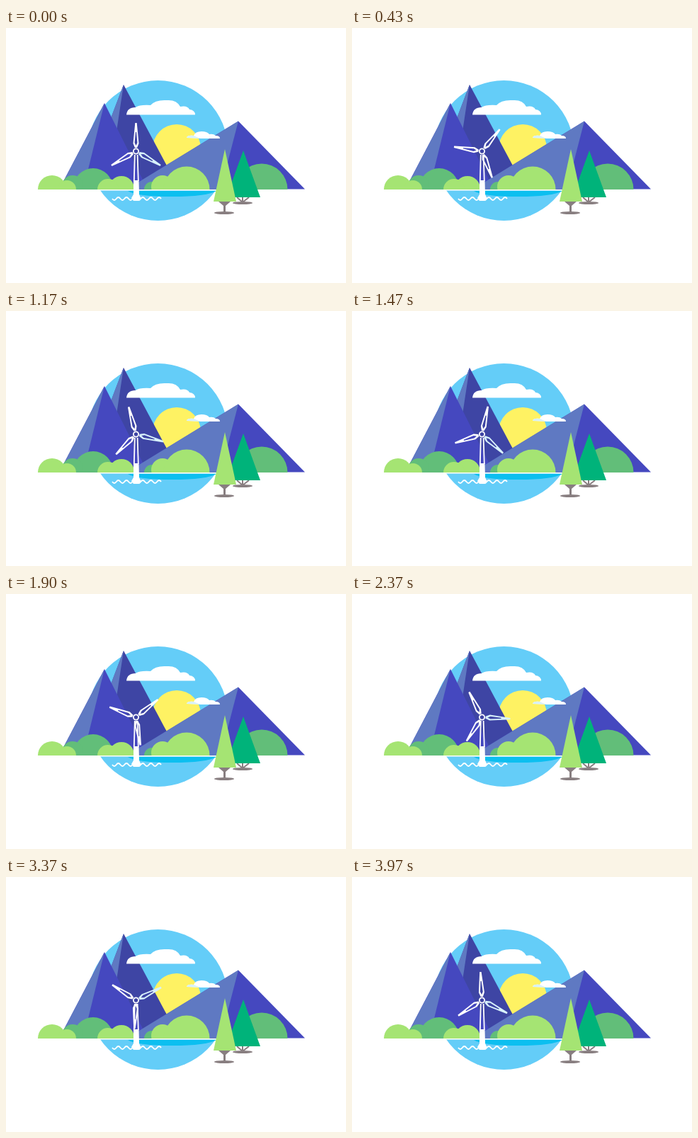
An HTML page for the animation above (4010 ms loop, 480 by 360 pixels).

```html
<!DOCTYPE html>
<html lang="en">
<head>
<meta charset="utf-8">
<title>Wind turbine landscape</title>
<style>
html, body { margin: 0; width: 100%; height: 100%; overflow: hidden; background: #fff; }
svg { display: block; width: 480px; height: 360px; }
.sky { fill: #64cdf8; }
.light { fill: #5f79c2; }
.face { fill: #4548bf; }
.shade { fill: #3e45a4; }
.lime { fill: #a5e473; }
.green { fill: #62be79; }
.white { fill: #fff; }
.pale { fill: #d8f1fb; }
.wood { fill: #887e80; }
.line { fill: none; stroke: #fff; stroke-width: 1.8; }
.twig { fill: none; stroke: #887e80; stroke-width: 2; }
</style>
</head>
<body>
<svg viewBox="0 0 480 360">
  <defs>
    <clipPath id="ground"><rect width="480" height="228"/></clipPath>
    <path id="blade" fill-rule="evenodd" d="M-1.600-5-4-11-1.200-40H1.200L4-11 1.600-5ZM0-8-1.900-12-.6-27H.6L1.900-12Z"/>
  </defs>

  <circle class="sky" cx="214.500" cy="173" r="99"/>
  <circle cx="241" cy="170" r="34" fill="#fef263"/>

  <g clip-path="url(#ground)">
    <path class="shade" d="M166 80 245 228H110Z"/>
    <path class="light" d="M166 80 143 140 156 146Z"/>
    <path class="face" d="M139 106 200 228H75Z"/>
    <path class="light" d="M139 106 109 228H75Z"/>
    <path class="face" d="M328 131.500 422 227.500H171Z"/>
    <path class="light" d="M328 131.500 303 228H170Z"/>

    <g class="green">
      <circle cx="123" cy="226" r="28"/>
      <circle cx="94" cy="223" r="15"/>
      <circle cx="206" cy="228" r="11"/>
      <circle cx="361" cy="228" r="36.500"/>
    </g>
    <g class="lime">
      <circle cx="65" cy="228" r="20"/>
      <circle cx="86" cy="228" r="13"/>
      <circle cx="163" cy="227" r="18"/>
      <circle cx="144" cy="228" r="15"/>
      <circle cx="221" cy="224" r="16"/>
      <circle cx="255" cy="228" r="32.500"/>
    </g>
  </g>

  <path class="white" d="M45 228H300V229.500H45Z"/>
  <path d="M172 230H297Q283 238 235 238 185 238 172 230Z" fill="#0cbff0"/>

  <g class="white">
    <path d="M170 122.500Q171 112 183 112 189 108 204 109 211 101 227 102 241 101 246 111 256 109 259 115 267 116 267 122.500Z"/>
    <path d="M255 155Q256 151 265 152 267 146 276 146 284 146 287 150 293 149 296 152 302 152 302 156H275Q262 155 255 155Z"/>
    <path d="M180 215H187.500L188 235 191 241 188 244H180L177 240 180 235Z"/>
  </g>
  <path class="pale" d="M255 155Q256 151 265 152L274 156Z"/>
  <path class="line" d="M181.800 179 180.800 216M185.600 179 186.800 216"/>
  <path class="line" d="M150 241q2.900 4 5.750 0t5.750 0 5.750 0 5.750 0 5.750 0 5.750 0 5.750 0 5.750 0 5.750 0 5.750 0 5.750 0 5.750 0"/>

  <g id="rotor">
    <use href="#blade"/><use href="#blade"/><use href="#blade"/>
  </g>
  <circle cx="183.500" cy="174" r="3.600" fill="#3e45a4" stroke="#fff" stroke-width="1.800"/>

  <path class="twig" d="M326 239 334 246 343 239M334 238V247"/>
  <ellipse class="wood" cx="334" cy="247" rx="14" ry="2"/>
  <path d="M335 173 359 239H311Z" fill="#00b37a"/>
  <path class="wood" d="M300 245H317L310 251V261H307V251Z"/>
  <ellipse class="wood" cx="308" cy="261" rx="14" ry="2"/>
  <path class="lime" d="M309 171 325 245H293Z"/>
</svg>
<script>
const LOOP = 4010, STEPS = 120;
const blades = [...document.querySelectorAll('#rotor use')];

function draw(now) {
  const t = Math.floor(now % LOOP / 10) * 10;
  const step = Math.min(STEPS - 1, Math.floor((t + 4) * 0.03));
  blades.forEach((blade, i) => {
    const angle = (step * 360 / STEPS + i * 120) % 360;
    blade.setAttribute('transform', `translate(183.5 174) rotate(${angle})`);
    // blades facing right catch a pale sky tint
    blade.setAttribute('class', angle > 55 && angle < 155 ? 'pale' : 'white');
  });
}

const start = performance.now();
function tick() {
  draw(performance.now() - start);
  requestAnimationFrame(tick);
}
tick();
</script>
</body>
</html>
```
